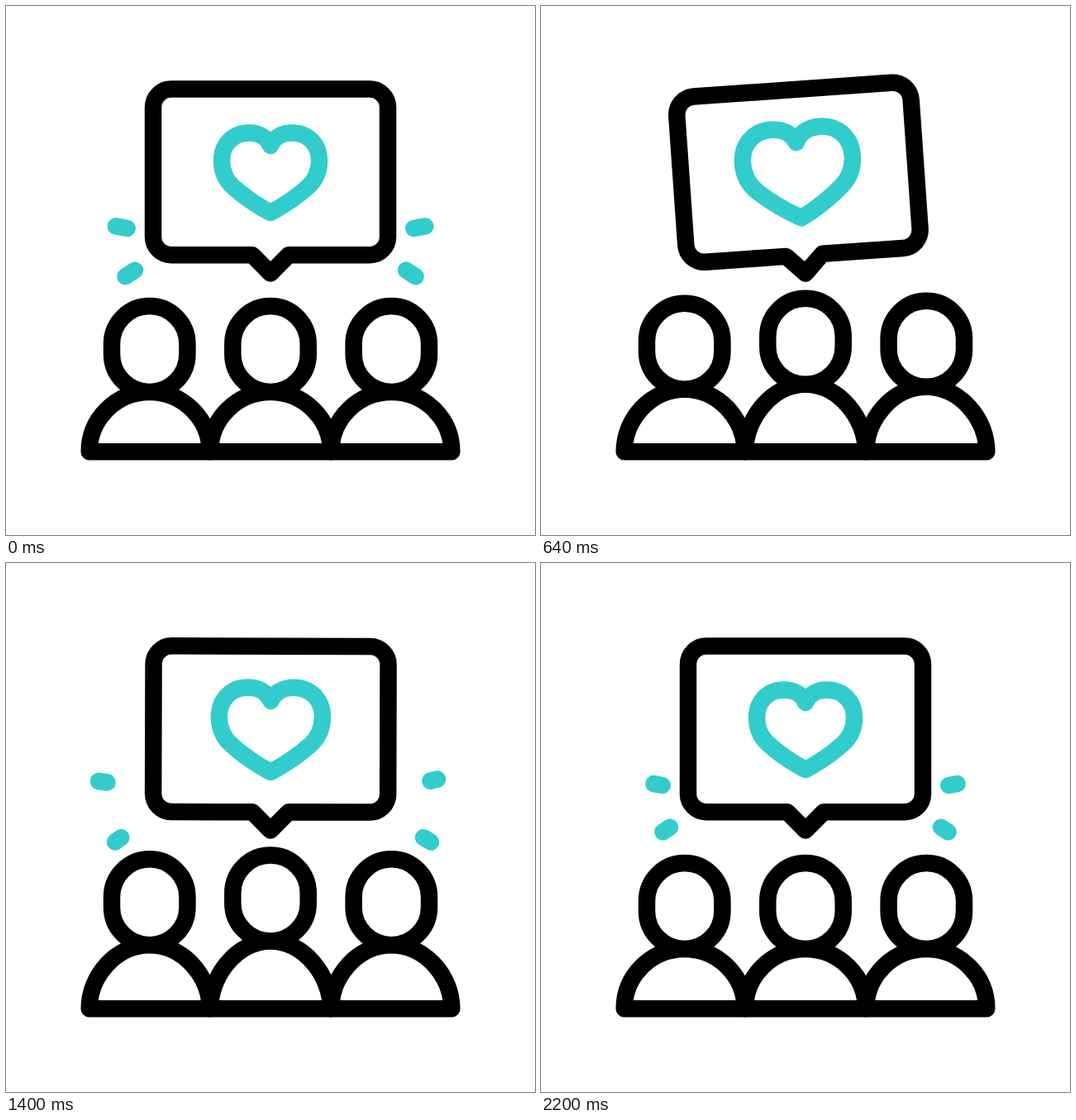
An HTML page that plays this animation: 640x640 px, repeating every 2240 ms.

```html
<!DOCTYPE html>
<html lang="en">
<head>
<meta charset="utf-8">
<title>Audience feedback</title>
<style>
  html, body { margin: 0; width: 100%; height: 100%; overflow: hidden; background: #fff; }
  svg { display: block; width: 100%; height: 100%; }
  path { fill: none; stroke: #000; stroke-width: 20.5; stroke-linecap: round; stroke-linejoin: round; }
  .accent { stroke: #3cc; }
  #heart { vector-effect: non-scaling-stroke; }
</style>
</head>
<body>
<svg viewBox="0 0 640 640">
  <g id="people"></g>
  <g id="dashes"></g>
  <g id="bubble">
    <path d="M342 301.3H440a22 22 0 0 0 22-22V122.6a22 22 0 0 0-22-22H200a22 22 0 0 0-22 22V279.3a22 22 0 0 0 22 22H298L320 323.5Z"/>
    <path id="heart" class="accent" d="M320 169C316 159 306 153.5 294 153.5C274 153.5 261 168 261 187C261 200 266 211 275 219C285 228 303 241 320 250C337 241 355 228 365 219C374 211 379 200 379 187C379 168 366 153.5 346 153.5C334 153.5 324 159 320 169Z"/>
  </g>
</svg>
<script>
  const LOOP = 2240, STEP = 40, MID = 320;
  const $ = id => document.getElementById(id);

  const addPath = (parent, cls) => {
    const path = document.createElementNS('http://www.w3.org/2000/svg', 'path');
    if (cls) path.setAttribute('class', cls);
    return parent.appendChild(path);
  };

  // Eased 0 to 1 between two times, and a rise and fall around a peak
  const ramp = (t, from, to) => {
    const u = Math.min(1, Math.max(0, (t - from) / (to - from)));
    return u * u * (3 - 2 * u);
  };
  const pulse = (t, from, peak, to) => ramp(t, from, peak) - ramp(t, peak, to);

  const tilt = t => 5.4 * (pulse(t, 1360, 1760, 2040) - pulse(t, 0, 480, 960));
  const hop = t => 9.5 * (pulse(t, 0, 400, 800) + pulse(t, 800, 1200, 1600));
  const beat = t => 1
    - 0.17 * (pulse(t, 0, 400, 800) + pulse(t, 800, 1200, 1600))
    + 0.29 * (pulse(t, 400, 800, 1200) + pulse(t, 1200, 1600, 2040));

  const people = [-1, 0, 1].map((side, i) => ({
    x: MID + side * 146.3, delay: i * 200, path: addPath($('people'))
  }));

  // Short dashes mirror each other; each flies to its own far point
  const dash = (side, [x0, y0], [x1, y1], far) => ({
    inner: [MID + side * x0, y0], rest: [MID + side * x1, y1], far, path: addPath($('dashes'), 'accent')
  });
  const upper = [[173.2, 269], [187.2, 266.4]];
  const lower = [[164, 319.7], [175.6, 327.3]];
  const dashes = [
    dash(-1, ...upper, [112, 264]),
    dash(-1, ...lower, [132, 337.5]),
    dash(1, ...upper, [522, 261.5]),
    dash(1, ...lower, [514, 337.5])
  ];

  const mix = (a, b, k) => a.map((v, i) => v + (b[i] - v) * k);

  function dashEnds(t, { inner, rest, far }) {
    if (t < 480) {
      const k = ramp(t, 0, 480);
      return [mix(inner, far, k), mix(rest, far, k)];
    }
    if (t >= 880 && t < 1600) {
      return [mix(inner, far, ramp(t, 1120, 1560)), mix(inner, far, ramp(t, 860, 1260))];
    }
    if (t > 2120) return [inner, mix(inner, rest, ramp(t, 2120, LOOP))];
    return [];
  }

  // The shoulders keep their base tangents while the top follows the head
  function person(x, lift) {
    const r = 45.7, w = 73, base = 539.2, top = 467 - lift, side = base - 40, k = 40.3;
    return `M${x - r} ${408.7 - lift}a${r} ${r} 0 0 1 ${2 * r} 0v12.6a${r} ${r} 0 0 1 ${-2 * r} 0Z` +
      `M${x - w} ${base}C${x - w} ${side} ${x - k} ${top} ${x} ${top}` +
      `S${x + w} ${side} ${x + w} ${base}Z`;
  }

  function draw(t) {
    for (const { x, delay, path } of people) path.setAttribute('d', person(x, hop(t - delay)));
    for (const d of dashes) {
      const ends = dashEnds(t, d);
      d.path.setAttribute('d', ends.length ? `M${ends.join('L')}` : '');
    }
    $('bubble').setAttribute('transform', `rotate(${tilt(t)} ${MID} 323.5)`);
    $('heart').setAttribute('transform',
      `translate(${MID} 201.8) scale(${beat(t)}) translate(${-MID} -201.8)`);
  }

  const start = performance.now();
  function frame() {
    const t = (performance.now() - start) % LOOP;
    draw(Math.floor(t / STEP) * STEP);
    requestAnimationFrame(frame);
  }
  frame();
</script>
</body>
</html>
```
